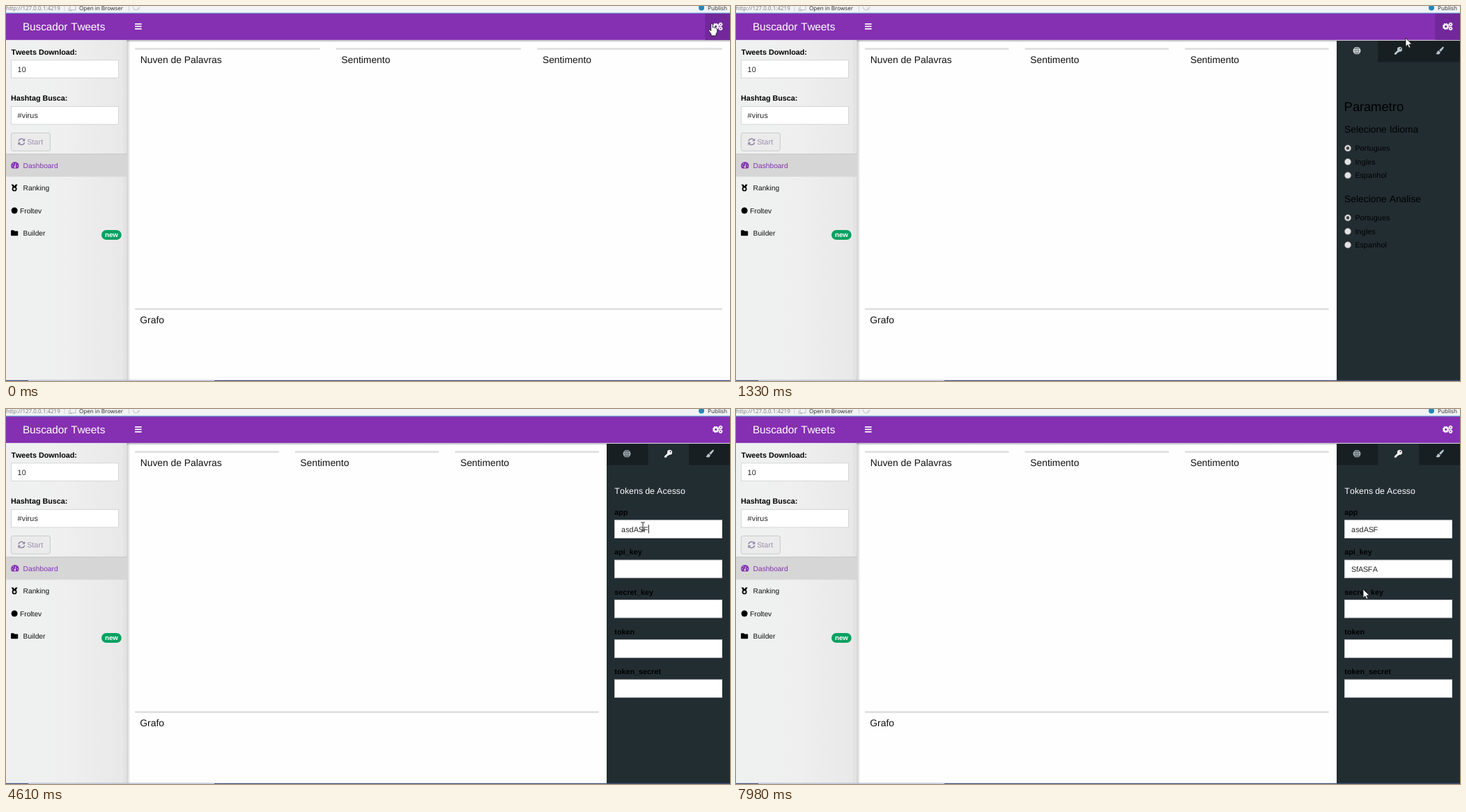
Write an HTML page that moves like this. It is 1039 px wide and 539 px high and loops after 8 s.

```html
<!DOCTYPE html>
<html lang="pt">
<head>
<meta charset="utf-8">
<title>Buscador</title>
<style>
html, body { margin: 0; width: 100%; height: 100%; overflow: hidden; background: #fefefe; }
svg { display: block; }
text { font-family: "Liberation Sans", Arial, sans-serif; font-kerning: none; text-rendering: geometricPrecision; }
.ui { font-family: "Open Sans", "Noto Sans", sans-serif; }
</style>
</head>
<body>
<svg id="stage" width="1039" height="539" viewBox="0 0 1039 539">
  <defs>
    <linearGradient id="side"><stop offset="0" stop-color="#eff1f1"/><stop offset=".5" stop-color="#efefef"/><stop offset="1" stop-color="#e8e8e8"/></linearGradient>
    <linearGradient id="edge"><stop offset="0" stop-opacity=".2"/><stop offset="1" stop-opacity="0"/></linearGradient>
    <linearGradient id="drop" x2="0" y2="1"><stop offset="0" stop-opacity=".28"/><stop offset="1" stop-opacity="0"/></linearGradient>
  </defs>
</svg>
<script>
const LOOP = 8000, TICK = 78;
const K = 0.7696;              // page pixels to stage pixels
const PANEL_W = 177, PURPLE = '#852fb2', DARK = '#222d32';
const stage = document.getElementById('stage');
const ruler = document.createElement('canvas').getContext('2d');
ruler.font = '100px "Liberation Sans", Arial, sans-serif';

function el(tag, attrs, parent = stage) {
  const node = document.createElementNS('http://www.w3.org/2000/svg', tag);
  for (const key in attrs) node.setAttribute(key, attrs[key]);
  parent.appendChild(node);
  return node;
}
const group = (parent, x = 0, y = 0) => el('g', { transform: `translate(${x} ${y})` }, parent);
const rect = (x, y, width, height, fill, parent, more) =>
  el('rect', { x, y, width, height, fill, ...more }, parent);
const circle = (cx, cy, r, fill, parent, more) => el('circle', { cx, cy, r, fill, ...more }, parent);
const path = (d, fill, parent, more) => el('path', { d, fill, ...more }, parent);
const line = (d, stroke, width, parent, more) =>
  path(d, 'none', parent, { stroke, 'stroke-width': width, ...more });
const show = (node, on) => node.setAttribute('visibility', on ? 'inherit' : 'hidden');
const move = (node, x, y) => node.setAttribute('transform', `translate(${x} ${y})`);

// Glyph advances snap to whole page pixels, as in hinted screen text.
const advance = (ch, size) => Math.round(ruler.measureText(ch).width * size / 100) * K;
const widthOf = (s, size) => [...s].reduce((sum, ch) => sum + advance(ch, size), 0);

function setText(node, s, x, size) {
  let pen = x;
  node.textContent = s;
  node.setAttribute('x', [...s].map(ch => { const at = pen; pen += advance(ch, size); return at.toFixed(2); }).join(' ') || x);
}
function text(x, y, s, size, fill = '#111', parent, more) {
  const node = el('text', { x, y, fill, 'font-size': size * K, ...more }, parent);
  if (more || size % 1) node.textContent = s;
  else setText(node, s, x, size);
  return node;
}
const bold = (x, y, s, parent) => text(x, y, s, 14, '#000', parent, { 'font-weight': 700 });
const field = (x, y, parent) =>
  rect(x + .5, y + .5, 154, 25.6, '#fff', parent, { stroke: '#d0d2d6', 'stroke-width': .9 });

function gear(x, y, r, parent) {
  circle(x, y, r * .62, 'none', parent, { stroke: '#fff', 'stroke-width': r * .55 });
  circle(x, y, r * .9, 'none', parent,
    { stroke: '#fff', 'stroke-width': r * .32, 'stroke-dasharray': r * .9 * Math.PI / 8 });
}

function refresh(x, y, color, parent) {
  const g = group(parent, x, y);
  line('M-4.3 -.6A4.4 4.4 0 0 1 3.2 -3M4.3 .6A4.4 4.4 0 0 1 -3.2 3', color, 1.5, g);
  path('M5 -5V-.9H.9ZM-5 5V.9H-.9Z', color, g);
}

// Content boxes
const columns = ['Nuven de Palavras', 'Sentimento', 'Sentimento'].map(label => {
  const g = group();
  const bar = rect(0, 60.4, 10, 2.4, '#dcdde0', g);
  text(7.7, 82, label, 18, '#111', g);
  return { g, bar };
});
const graphBar = rect(185, 434.4, 10, 2.4, '#dcdde0');
text(192.3, 456, 'Grafo', 18);

// Settings panel
const panel = group();
rect(0, 50, PANEL_W + 2, 489, DARK, panel);
const tabs = [0, 1, 2].map(i => rect(i * 59, 50, 59.3, 30.6, '#181f23', panel));
const icons = [29, 88.5, 148].map(x => group(panel, x, 64.2));

circle(0, 0, 5.4, 'currentColor', icons[0]);
line('M-5.4 0H5.4M0 -5.4V5.4M-4.3 -2.9H4.3M-4.3 2.9H4.3', DARK, .6, icons[0]);
el('ellipse', { rx: 2.6, ry: 5.3, fill: 'none', stroke: DARK, 'stroke-width': .6 }, icons[0]);

circle(2, -2, 3.5, 'currentColor', icons[1]);
path('M-.8 -1L-5.6 3.8V5.6H-2.8V4.2H-1.4V2.8H0L1.6 1.2Z', 'currentColor', icons[1]);
circle(3, -3, 1, DARK, icons[1]);

path('M5.2 -5.6Q6.3 -5 5.5 -3.6L1.4 1.6L-1 -.6L3.8 -5.2Q4.6 -6 5.2 -5.6Z', 'currentColor', icons[2]);
path('M-1.7 .1L.8 2.4Q.4 5.4 -2.6 5.4Q-4.9 5.4 -5.6 3.5Q-4.2 3.8 -3.9 2.2Q-3.5 .2 -1.7 .1Z', 'currentColor', icons[2]);

const options = group(panel);
text(10.6, 151.3, 'Parametro', 24, '#000', options);
[['Selecione Idioma', 182], ['Selecione Analise', 282]].forEach(([title, y]) => {
  text(11, y, title, 18, '#000', options);
  ['Portugues', 'Ingles', 'Espanhol'].forEach((label, i) => {
    const cy = y + 22.4 + i * 19.5;
    circle(16, cy, 4.6, '#e4e4e4', options, { stroke: '#777', 'stroke-width': .7 });
    if (!i) circle(16, cy, 2.3, '#444', options);
    text(26.5, cy + 3.9, label, 14, '#000', options);
  });
});

const tokens = group(panel);
text(11.3, 122.3, 'Tokens de Acesso', 16, '#fff', tokens);
['app', 'api_key', 'secret_key', 'token', 'token_secret'].forEach((label, i) => {
  bold(11.3, 152 + i * 57.3, label, tokens);
  field(11, 159.3 + i * 57.3, tokens);
});
const inputs = [176.6, 233.9].map(y => text(21, y, '', 14, '#222', tokens));
const carets = [166.5, 224].map(y => rect(0, y, 1, 12, '#111', tokens));

// Left menu
rect(0, 48, 173.4, 491, 'url(#side)');
rect(173.4, 48, 5, 491, 'url(#edge)');
rect(168, 48, 5.4, 491, '#000', stage, { opacity: .025 });
bold(7.4, 70, 'Tweets Download:');
field(7, 77.3);
text(16.6, 94.8, '10', 14, '#222');
bold(7, 136.3, 'Hashtag Busca:');
field(7, 144);
text(16.6, 161.3, '#virus', 14, '#222');
rect(7.4, 182.4, 56, 25.8, '#ebebeb', stage, { rx: 2.6, stroke: '#c6c6c6', 'stroke-width': .9 });
refresh(22.3, 195.2, '#9086a6');
text(30.3, 199, 'Start', 14, '#9a90ad');

rect(0, 212.8, 173.4, 32.6, '#d6d6d6');
rect(0, 212.4, 173.4, 1, '#c4c4c4');
[['Dashboard', 24.6, PURPLE], ['Ranking', 24.6], ['Froltev', 20], ['Builder', 24.6]]
  .forEach(([label, x, fill], i) => text(x, 232.6 + i * 32.5, label, 13.3, fill));

path('M8.7 233.6A5.7 5.7 0 1 1 17 233.6Z', PURPLE);
line('M12.8 231.4L14 226.3', '#d6d6d6', 1);
circle(12.8, 231.4, 1.3, '#d6d6d6');
[[9.2, 229.7], [10.5, 226.8], [16.3, 229.7]].forEach(([x, y]) => circle(x, y, .7, '#d6d6d6'));
circle(12.1, 262.9, 2.6, 'none', stage, { stroke: '#000', 'stroke-width': 1.7 });
path('M7.6 256.5H10.4L12.1 259L13.8 256.5H16.6L14.2 260.4H10Z', '#000');
circle(12.1, 294, 4.5, '#000');
path('M7 323.1Q7 322.2 8 322.2H11.1L12.4 323.5H16.2Q17.2 323.5 17.2 324.5V329.2Q17.2 330.2 16.2 330.2H8Q7 330.2 7 329.2Z', '#000');
rect(137, 322, 28.7, 14, '#06a162', stage, { rx: 7 });
text(151.4, 332.4, 'new', 12.6, '#fff', stage, { 'font-weight': 700, 'text-anchor': 'middle' });

// Header
rect(173.4, 48.8, 866, 3.6, 'url(#drop)');
rect(0, 10.4, 1039, 38.4, PURPLE);
const hover = rect(1003.3, 10.4, 36, 38.4, '#72289a');
text(24, 35, 'Buscador Tweets', 20, '#fff');
[25, 28.5, 32].forEach(y => rect(185, y, 9.6, 1.7, '#fff'));
gear(1018.6, 29.4, 4.5);
gear(1025.5, 26.4, 2.8);
gear(1025.5, 32.3, 2.8);

// Browser strip
rect(0, 0, 1039, 10, '#f1f3f5');
rect(0, 9.7, 1039, 1.2, '#5f8fcb');
const ui = { class: 'ui' };
text(0, 6, 'http://127.0.0.1:4219', 10.4, '#777', stage, ui);
text(105, 6, 'Open in Browser', 10.45, '#222', stage, ui);
text(1007, 6, 'Publish', 10.6, '#222', stage, ui);
[83.5, 176].forEach(x => rect(x, 0, .8, 7, '#c5c8cc'));
line('M92 0V5.6H100V0M90 2V6.6H95', '#b4b8be', .9);
line('M182.3 1A4.6 4.6 0 1 0 191.7 1M188 3.2H191.5', '#c3c6ca', 1.1);
circle(998, 2.6, 4, '#2586b8');

// Desktop edge
rect(0, 537.8, 1039, 1.2, '#44507c');
rect(32, 537.8, 267, 1.2, '#c3cbdc');

// Pointer
const ring = circle(0, 0, 12 * K, '#ff0', stage, { 'fill-opacity': .47 });
const pointer = group();
const outline = { stroke: '#111', 'stroke-width': .8, 'stroke-linejoin': 'round' };
const shapes = {
  arrow: path('M0 0V12.4L2.9 9.8L4.8 14.3L6.9 13.4L5 9H8.9Z', '#fff', pointer, outline),
  hand: path('M-1.3 1Q0 -.4 1.2 1V6L2.3 5.2Q3.5 5.2 3.7 6.5Q5.2 5.6 5.8 7.2Q7.4 6.8 7.6 8.6V12.2L6 15V17.8H-1V15.4L-4.6 10.2Q-4.6 8.6 -3 9L-1.3 10.8Z', '#fff', pointer, outline),
  beam: line('M-2.8 -6H-.8L0 -5.4L.8 -6H2.8M0 -5.4V5.4M-2.8 6H-.8L0 5.4L.8 6H2.8', '#222', 1, pointer)
};

// start, end, from, to
const moves = [
  [852, 1320, 1013, 25, 961, 46],
  [1320, 1720, 961, 46, 951, 58],
  [2652, 3590, 951, 58, 914, 169],
  [5242, 6020, 914, 169, 901, 232],
  [7742, 7976, 901, 232, 900, 259]
];
const clicks = [[80, 236], [2040, 2270], [3910, 4060], [6190, 6480]];
const typing = [
  [[4210, 'as'], [4390, 'asd'], [4530, 'asdAS'], [4610, 'asdASF']],
  [[6660, 'S'], [6720, 'Sf'], [6950, 'SfAS'], [7120, 'SfASF'], [7270, 'SfASFA']]
];
const blinks = [[[3910, 5160], [5690, 6190]], [[6250, 7820]]];

const within = (spans, t) => spans.some(([a, b]) => t >= a && t < b);
const clamp = v => Math.min(1, Math.max(0, v));
const ease = p => (1 - Math.cos(Math.PI * p)) / 2;
const sampled = (t, from) => from + Math.floor((t - from) / TICK) * TICK;

function pointerAt(t) {
  let at = [1013, 25];
  moves.forEach(([a, b, x0, y0, x1, y1], i) => {
    if (t < a) return;
    const p = t >= b ? 1 : clamp((sampled(t, a) - a) / (b - a));
    const e = i < 2 ? p : ease(p);
    at = [x0 + (x1 - x0) * e, y0 + (y1 - y0) * e];
  });
  return at;
}

function layout(t) {
  const open = ease(clamp((sampled(t, 80) - 170) / 376));
  const left = 1039 - PANEL_W * open;
  const right = left - 11.3, gap = 23.1;
  const w = (right - 185 - 2 * gap) / 3;
  columns.forEach(({ g, bar }, i) => {
    move(g, 185 + i * (w + gap), 0);
    bar.setAttribute('width', w);
  });
  graphBar.setAttribute('width', right - 185);
  move(panel, left, 0);
}

function render(t) {
  layout(t);
  const tab = t < 2270 ? 0 : 1;
  tabs.forEach((node, i) => show(node, i !== tab));
  icons.forEach((node, i) => node.setAttribute('color', i === tab ? '#fff' : '#b8c7ce'));
  show(options, tab === 0);
  show(tokens, tab === 1);
  show(hover, t < 2040);

  inputs.forEach((node, i) => {
    const typed = typing[i].reduce((s, [at, value]) => t >= at ? value : s, '');
    if (node.textContent !== typed) setText(node, typed, 21, 14);
    carets[i].setAttribute('x', 21.2 + widthOf(typed, 14));
    show(carets[i], tab === 1 && within(blinks[i], t));
  });

  const [x, y] = pointerAt(t);
  const overField = tab === 1 && [159.3, 216.6].some(top => y > top && y < top + 26.6);
  const kind = x > 1003 && y < 49 ? 'hand' : overField ? 'beam' : 'arrow';
  for (const name in shapes) show(shapes[name], name === kind);
  move(pointer, x, y);
  move(ring, x, y);
  show(ring, within(clicks, t));
}

function frame() {
  render(performance.now() % LOOP);
  requestAnimationFrame(frame);
}
frame();
</script>
</body>
</html>
```
